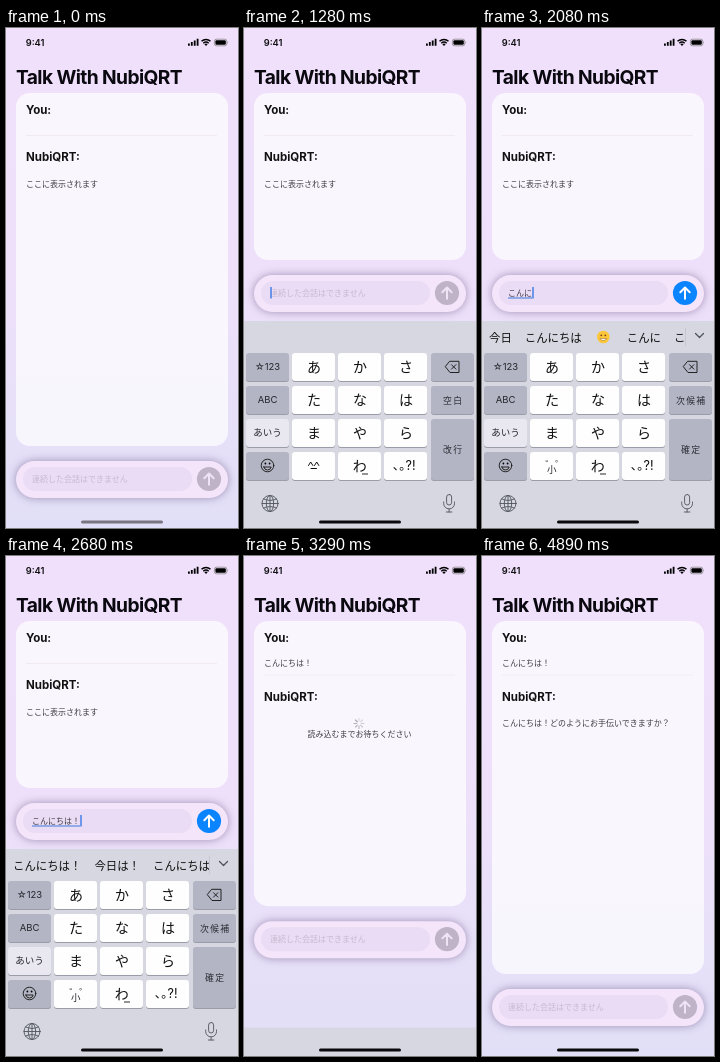
Write an HTML page that moves like this. It is 232x500 px and loops after 6.49 s.

```html
<!DOCTYPE html>
<html>
<head>
<meta charset="utf-8">
<title>Chat app demo</title>
<style>
  html, body { margin: 0; width: 100%; height: 100%; overflow: hidden; background: #e9e0f9; }
  svg { display: block; width: 232px; height: 500px; }
  text { font-family: Inter, "Noto Sans CJK JP", "Noto Sans CJK", sans-serif; fill: #111; white-space: pre; }
  .title { font-size: 19.2px; font-weight: 700; letter-spacing: -.6px; fill: #0b0910; }
  .head { font-size: 11.5px; font-weight: 700; }
  .body { font-size: 8px; fill: #3d3b42; font-family: "Noto Sans CJK JP", "Noto Sans CJK", sans-serif; }
  .hint { fill: #c6b9d0; }
  .mid { text-anchor: middle; }
  .kana { font-size: 14px; }
  .fn { font-size: 9.5px; fill: #26262c; }
  .wide { font-size: 8.8px; letter-spacing: 1.3px; fill: #2c2c34; }
  .word { font-size: 11.4px; }
  .line { fill: none; stroke: #50545c; stroke-linecap: round; stroke-linejoin: round; }
  #bar { filter: drop-shadow(0 0 4.5px rgba(84, 62, 112, .5)); }
</style>
</head>
<body>
<svg viewBox="0 0 232 500">
  <defs>
    <linearGradient id="bg" x1="0" y1="0" x2="0" y2="1">
      <stop offset="0" stop-color="#f0e0fb"/>
      <stop offset=".5" stop-color="#eee0fa"/>
      <stop offset="1" stop-color="#e1dff7"/>
    </linearGradient>
    <clipPath id="words"><rect y="293" width="203" height="32"/></clipPath>
  </defs>
  <rect width="232" height="500" fill="url(#bg)"/>

  <g id="status">
    <text x="19.700" y="18" font-size="9.3" font-weight="600">9:41</text>
    <path d="M182 15.5h1.8v2.3h-1.8zM184.9 14h1.8v3.8h-1.8zM187.8 12.4h1.8v5.4h-1.8zM190.7 10.8h1.8v7h-1.8z"/>
    <g fill="none" stroke="#000" stroke-width="1.5">
      <path d="M195.5 13.2a6.6 6.6 0 0 1 9 0M197.3 15.2a4 4 0 0 1 5.4 0"/>
    </g>
    <path d="M200 18l-1.6-1.7a2.3 2.3 0 0 1 3.2 0z"/>
    <rect x="208.4" y="11.2" width="12.4" height="6.6" rx="2" fill="none" stroke="#777" stroke-width=".7"/>
    <rect x="209.4" y="12.2" width="10.4" height="4.6" rx="1.1"/>
    <path d="M221.5 13.4q1.2 1.1 0 2.2z" fill="#777"/>
  </g>

  <text class="title" x="10" y="55.5">Talk With NubiQRT</text>
  <rect id="card" x="10" y="65" width="212" height="353" rx="14" fill="#fff" fill-opacity=".72"/>
  <text class="head" x="20" y="86">You:</text>
  <text class="body" id="asked" x="20" y="110">こんにちは！</text>
  <g id="reply">
    <path d="M20 107.5H211" stroke="#efe8f4" stroke-width=".8"/>
    <text class="head" x="20" y="133.300">NubiQRT:</text>
  </g>
  <text class="body" id="answer" x="20"></text>
  <g id="wait">
    <g id="spin"></g>
    <text class="body mid" x="115.5" y="181">読み込むまでお待ちください</text>
  </g>

  <g id="entry">
    <rect id="bar" x="10" y="433" width="212" height="37" rx="18.5" fill="#f4e5fb"/>
    <rect x="17" y="439" width="169" height="24" rx="12" fill="#eadcf4"/>
    <rect id="mark" x="26" y="455.500" height="1" fill="#3f7be0"/>
    <text class="body" id="typed" x="26" y="454"></text>
    <rect id="caret" y="445" width="1.4" height="11.500" fill="#3a78e6"/>
    <circle id="send" cx="203" cy="451" r="12.100"/>
    <path id="arrow" d="M203 456.800V445.600M198.300 450.200L203 445.500L207.700 450.200" fill="none" stroke-width="2" stroke-linecap="round" stroke-linejoin="round"/>
  </g>

  <g id="board">
    <rect y="293" width="232" height="207" fill="#d7d7e1"/>
    <g id="strip">
      <g id="list" clip-path="url(#words)"></g>
      <path d="M203.500 300V318" stroke="#bfc0c9" stroke-width=".7"/>
      <path class="line" d="M213.500 305.500L217.500 309.500L221.500 305.500" stroke-width="1.3"/>
    </g>
    <g id="keys"></g>
    <g class="line" stroke-width=".9">
      <circle cx="26" cy="475.500" r="8"/>
      <ellipse cx="26" cy="475.500" rx="3.700" ry="8"/>
      <path d="M18 475.500H34M26 467.500V483.500M19.700 471Q26 474 32.300 471M19.700 480Q26 477 32.300 480"/>
      <rect x="202.600" y="466.500" width="5" height="10.500" rx="2.500"/>
      <path d="M199.700 474V475.500A5.400 5.400 0 0 0 210.500 475.500V474M205.100 481V484M202.300 484H207.900"/>
    </g>
  </g>
  <rect id="home" x="75" y="492.400" width="82" height="3" rx="1.500"/>
</svg>

<script>
const LOOP = 6490;
const STEPS = [0, 100, 290, 490, 680, 880, 1080, 1280, 1480, 1680, 1880, 2080, 2250, 2480,
  2680, 2880, 3070, 3290, 3490, 3690, 3890, 4090, 4290, 4490, 4690, 4890];
const COMMIT = 3070, SENT = 3290, ANSWERED = 4890;
const TYPING = [[1480, 'こ'], [1880, 'こん'], [2080, 'こんに'], [2250, 'こんにち'],
  [2480, 'こんにちは'], [2680, 'こんにちは！']];
const WORDS = {
  'こ': ['この', 'これ', 'ここ', 'こと', '子', '今年'],
  'こん': ['今度', '今回', '今', 'こんな', '今夜', '婚'],
  'こんに': ['今日', 'こんにちは', ':)', 'こんに', 'こんにゃく'],
  'こんにち': ['こんにちは', '今日', ':)', 'こんにち', '今日は'],
  'こんにちは': ['こんにちは', ':)', '今日は', 'こんにちは'],
  'こんにちは！': ['こんにちは！', '今日は！', 'こんにちは']
};
const GREY = '#b3b5c4', WHITE = '#fefefe', LIGHT = '#e9e8f0';

const $ = id => document.getElementById(id);
const label = (cls, x, y, s) => `<text class="mid ${cls}" x="${x}" y="${y}">${s}</text>`;
const key = (x, y, fill, inner = '', w = 43, h = 28, id = '') =>
  `<rect x="${x}" y="${y + .9}" width="${w}" height="${h}" rx="3" fill="#9a9ca8"/>` +
  `<rect ${id} x="${x}" y="${y}" width="${w}" height="${h}" rx="3" fill="${fill}"/>` + inner;

function buildKeys() {
  const rowY = r => 325 + 33 * r;
  let out = '';
  [...'あかさたなはまやら'].forEach((c, i) => {
    const x = 48 + 46 * (i % 3), y = rowY(Math.floor(i / 3));
    out += key(x, y, WHITE, label('kana', x + 22, y + 18.8, c));
  });
  ['☆123', 'ABC', 'あいう'].forEach((s, r) => {
    out += key(2, rowY(r), r === 2 ? LIGHT : GREY, label('fn', 23.5, rowY(r) + 17.3, s));
  });
  out += key(2, 424, GREY, `<g class="line" style="stroke:#222" stroke-width="1">
    <circle cx="23.500" cy="437.500" r="6.300"/><path d="M19.800 439H27.200Q26.500 442 23.500 442T19.800 439Z"/></g>
    <circle cx="21.400" cy="435.500" r=".9"/><circle cx="25.600" cy="435.500" r=".9"/>`);
  out += key(48, 424, WHITE,
    `<g id="face"><path class="line" style="stroke:#111" stroke-width="1"
      d="M64.500 437.500L66.700 434L68.900 437.500M70.500 437.500L72.700 434L74.900 437.500M67 440.500H72.500"/></g>` +
    `<g id="small">${label('fn', 69.7, 444.5, '小')}${label('fn', 68, 440, '゛')}${label('fn', 78, 440, '゜')}</g>`);
  out += key(94, 424, WHITE, label('kana', 115.7, 442.5, 'わ') +
    '<path d="M118 446H124" stroke="#111" stroke-width=".9"/>');
  out += key(140, 424, WHITE,
    '<text x="149" y="441.500" font-size="12.500">､｡?!</text>');
  out += key(187, 325, GREY, `<path class="line" style="stroke:#222" stroke-width="1"
    d="M206 333.300H215V344.500H206L201.500 338.900ZM207.500 336.700L211.900 341.100M211.900 336.700L207.500 341.100"/>`);
  out += key(187, 358, GREY, '<text class="mid wide" id="space" x="209.200" y="375.500"></text>');
  out += key(187, 391, GREY, '<text class="mid wide" id="enter" x="209.200" y="424.500"></text>',
    43, 61, 'id="enterKey"');
  $('keys').innerHTML = out;
}

function buildSpinner() {
  $('spin').innerHTML = Array.from({ length: 8 }, (_, i) =>
    `<path d="M0 -2.400V-4.900" stroke="#8d8794" stroke-width="1.2" stroke-linecap="round"
      transform="rotate(${i * 45})" opacity="${.25 + .07 * i}"/>`).join('');
}

function smiley(x) {
  return `<circle cx="${x}" cy="309" r="6.300" fill="#fcc63a"/><circle cx="${x - 2}" cy="307.300" r=".9" fill="#70461a"/>
    <circle cx="${x + 2}" cy="307.300" r=".9" fill="#70461a"/>
    <path d="M${x - 3.5} 310.500Q${x} 314.500 ${x + 3.5} 310.500Z" fill="#fff" stroke="#8a5a22" stroke-width=".5"/>`;
}

function wordRow(text) {
  let x = 7, out = '';
  for (const w of WORDS[text]) {
    if (w === ':)') { out += smiley(x + 8.5); x += 32; continue; }
    out += `<text class="word" x="${x}" y="313.500">${w}</text>`;
    x += w.length * 11.4 + 13;
  }
  return out;
}

// Critically damped spring, 0 to 1, settled after 300 ms.
function spring(ms) {
  if (ms <= 0) return 0;
  if (ms >= 300) return 1;
  const u = ms * .017;
  return 1 - (1 + u) * Math.exp(-u);
}

const show = (id, on) => { $(id).style.display = on ? '' : 'none'; };
const move = (id, y) => $(id).setAttribute('transform', `translate(0 ${y.toFixed(2)})`);
const attr = (id, name, v) => $(id).setAttribute(name, v);

function draw(t) {
  const board = spring(t - 644) - spring(t - 3085);
  const lift = 186 * (spring(t - 701) - spring(t - 3163));
  move('board', 207 * (1 - board));
  move('entry', -lift);
  attr('card', 'height', 353 - lift);

  const sent = t >= SENT;
  const entry = TYPING.filter(e => t >= e[0]).pop();
  const text = entry && !sent ? entry[1] : '';
  const marked = text !== '' && t < COMMIT;
  const width = text.length * 8;
  $('typed').textContent = text || '連続した会話はできません';
  $('typed').classList.toggle('hint', !text);
  attr('mark', 'width', marked ? width : 0);
  attr('caret', 'x', 26.3 + width);
  show('caret', t >= 680 && !sent);
  attr('send', 'fill', text ? '#0a84ff' : '#bfb3c8');
  attr('arrow', 'stroke', text ? '#fff' : '#eee4f5');

  show('strip', marked);
  if (marked) $('list').innerHTML = wordRow(text);
  show('face', !marked);
  show('small', marked);
  $('space').textContent = marked ? '次候補' : '空白';
  $('enter').textContent = marked ? '確定' : '改行';
  attr('enterKey', 'fill', t >= COMMIT && !sent ? WHITE : GREY);

  show('asked', sent);
  move('reply', sent ? 11.5 : 0);
  const done = t >= ANSWERED;
  show('wait', sent && !done);
  attr('spin', 'transform', `translate(115 167.500) rotate(${Math.floor((t - SENT) / 125) * 45})`);
  $('answer').textContent = done ? 'こんにちは！どのようにお手伝いできますか？' : sent ? '' : 'ここに表示されます';
  attr('answer', 'y', done ? 170 : 159.3);
  attr('home', 'fill', t < 1080 ? '#7a7580' : '#0a0a0c');
}

buildKeys();
buildSpinner();

const start = performance.now();
let last = -1;
function tick() {
  const t = (performance.now() - start) % LOOP;
  const step = STEPS.filter(s => s <= t).pop();
  if (step !== last) draw(last = step);
  requestAnimationFrame(tick);
}
tick();
</script>
</body>
</html>
```
